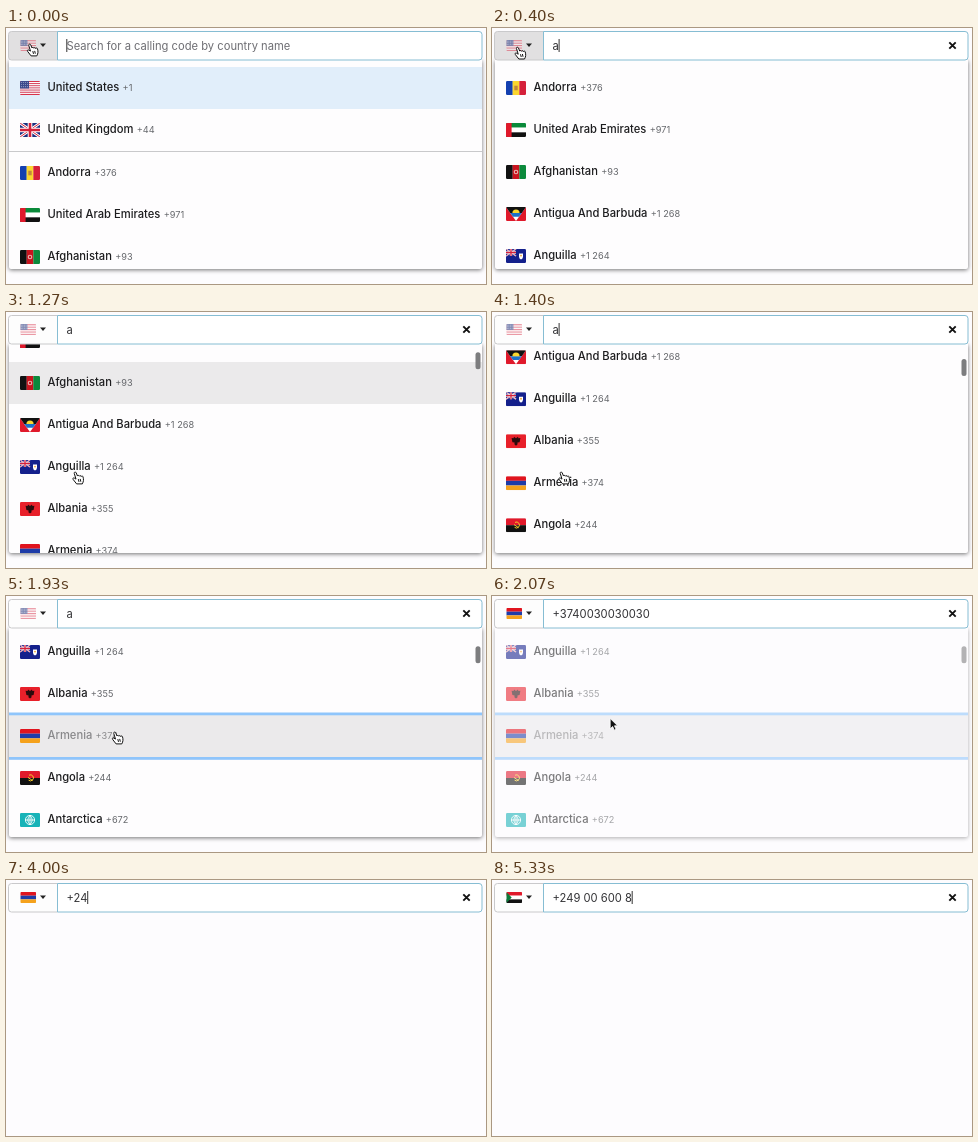
These frames come from a looping animation (480x256 px, 5390 ms). An HTML page:

```html
<!DOCTYPE html>
<html lang="en">
<head>
<meta charset="utf-8">
<title>Calling code picker</title>
<style>
  html, body { margin: 0; width: 100%; height: 100%; overflow: hidden; background: #fdfcfe; }
  svg { display: block; width: 100vw; height: 100vh; }
  text { font-family: Inter, Roboto, sans-serif; font-size: 11.2px; white-space: pre; }
  .name { font-weight: 500; fill: #1c1c1e; }
  .code { font-weight: 400; font-size: 9.2px; fill: #66686c; }
  .pressed .name, .pressed .code { fill: #88888a; }
  #sheet { filter: drop-shadow(0 1px 2px rgba(0, 0, 0, .55)); }
</style>
</head>
<body>
<svg viewBox="0 0 480 256" xmlns="http://www.w3.org/2000/svg">
  <defs>
    <clipPath id="listClip"><rect x="3" y="32" width="473" height="209"/></clipPath>
    <clipPath id="flagClip"><rect width="20" height="14" rx="1.2"/></clipPath>
  </defs>
  <g id="popup">
    <path id="sheet" d="M3 32H476V239a2 2 0 0 1-2 2H5a2 2 0 0 1-2-2Z" fill="#fefdfe"/>
    <g clip-path="url(#listClip)">
      <g id="start"></g>
      <g id="found">
        <rect id="hover" x="3" width="473" height="42" fill="#ebeaeb"/>
        <g id="ring" fill="#8fc5fb">
          <rect x="3" y="-2.5" width="473" height="2.8"/>
          <rect x="3" y="42" width="473" height="2.8"/>
        </g>
        <g id="rows"></g>
      </g>
      <rect id="thumb" x="469.5" width="5" height="17" rx="2.5" fill="#7d7d7f"/>
    </g>
  </g>
  <path id="button" d="M51.5 3.5H5.5a3 3 0 0 0-3 3V29a3 3 0 0 0 3 3H51.5Z" stroke="#c9c9cb"/>
  <g id="current"></g>
  <path d="M34 15.5h6l-3 3.6z" fill="#222"/>
  <path d="M51.5 3.5H473a3 3 0 0 1 3 3V29a3 3 0 0 1-3 3H51.5Z" fill="#fff" stroke="#86bdd3"/>
  <rect id="selection" x="60" y="10" height="15" fill="#b3d7fe"/>
  <text id="hint" x="60.5" y="21.7" fill="#6e6e73">Search for a calling code by country name</text>
  <text id="value" x="60.5" y="21.7" fill="#333336"></text>
  <rect id="caret" y="11" width="1" height="13" fill="#333"/>
  <path id="clear" d="M457.3 14.3l6.4 6.4m0-6.4l-6.4 6.4" stroke="#111" stroke-width="1.9"/>
  <path id="hand" fill="#fff" stroke="#111" stroke-width="1" stroke-linejoin="round"
    d="M-.9-.4C-1.8-.4-1.9.5-1.7 1.1L0 6.6-1.6 5.6C-2.8 5-3.6 6-2.9 6.9L.6 11.4H6.3C7.6 9 7.8 7 7 4.3 6.7 3.2 5.5 3.2 5.2 4 5 2.9 3.6 2.8 3.4 3.7 3 2.7 1.7 2.7 1.5 3.5L.2.3C0-.2-.4-.4-.9-.4ZM2.3 6.6l.7 2.8M4.2 6.4l.6 2.8"/>
  <path id="arrow" d="M0 0V10.4L2.5 8.1 4.1 11.7 5.9 10.9 4.3 7.4H7.5Z" fill="#111" stroke="#fff" stroke-width=".8"/>
</svg>
<script>
const $ = id => document.getElementById(id);
const rect = (x, y, w, h, c) => `<rect x="${x}" y="${y}" width="${w}" height="${h}" fill="${c}"/>`;
const path = (d, c) => `<path d="${d}" fill="${c}"/>`;
const line = (d, c, w) => `<path d="${d}" fill="none" stroke="${c}" stroke-width="${w}"/>`;
const dot = (x, y, r, c) => `<circle cx="${x}" cy="${y}" r="${r}" fill="${c}"/>`;
const bands = (...cs) => cs.map((c, i) => rect(0, i * 14 / cs.length, 20, 14 / cs.length, c)).join('');
const poles = (...cs) => cs.map((c, i) => rect(i * 20 / 3, 0, 20 / 3 + .1, 14, c)).join('');
const cross = line('M0 0L20 14M20 0L0 14', '#fff', 2.8) + line('M0 0L20 14M20 0L0 14', '#d3203a', 1) +
  line('M10 0V14M0 7H20', '#fff', 4.6) + line('M10 0V14M0 7H20', '#d3203a', 2.6);

const red = '#e0192b';
let stars = '';
for (let i = 0; i < 12; i++) stars += dot(1.3 + i % 4 * 2, 1.4 + Math.floor(i / 4) * 2.2, .45, '#fff');

const flags = {
  us: bands(...Array.from({length: 13}, (_, i) => i % 2 ? '#fff' : '#d8324a')) + rect(0, 0, 9, 7.5, '#3c4a8c') + stars,
  gb: rect(0, 0, 20, 14, '#1d3080') + cross,
  ad: poles('#1440b0', '#fbd62f', '#d5203a') + rect(8.3, 4.7, 3.4, 4.6, '#c2873c'),
  ae: bands('#0a8a3a', '#fff', '#111') + rect(0, 0, 5.6, 14, red),
  af: poles('#111', '#c8141e', '#0c8a3c') + dot(10, 7, 2.3, '#eab5b0') + dot(10, 7, 1.2, '#c8141e'),
  ag: rect(0, 0, 20, 14, red) + path('M0 0H20L10 14Z', '#fff') + path('M0 0H20L15.8 6H4.2Z', '#111') +
    path('M4.2 6H15.8L13 9.8H7Z', '#1d70c8') + path('M6.4 6a3.6 3.6 0 0 1 7.2 0Z', '#fbd62f'),
  ai: rect(0, 0, 20, 14, '#14208c') + `<g transform="scale(.5)">${rect(0, 0, 20, 14, '#14208c') + cross}</g>` +
    path('M13 4.5h4v3.2q0 2-2 2.8q-2-.8-2-2.8z', '#fff') + dot(15, 6.6, .9, '#f0a030'),
  al: rect(0, 0, 20, 14, '#e8202a') +
    path('M10 4L8 2.6 7.6 4 5.6 3.8 6.4 8 8.6 8.4 8.4 10.2 10 11.6 11.6 10.2 11.4 8.4 13.6 8 14.4 3.8 12.4 4 12 2.6Z', '#2a0a0c'),
  am: bands('#e0141e', '#1e3ca8', '#f5a21c'),
  ao: bands(red, '#111') + line('M9 4.2a3 3 0 1 1-.4 5M8 6.4l4.6 3.2', '#f5c828', 1),
  aq: rect(0, 0, 20, 14, '#17b3b8') + line('M14.6 7a4.6 4.6 0 1 1-9.2 0a4.6 4.6 0 1 1 9.2 0M5.4 7h9.2M10 2.4v9.2M10 2.4q-4.4 4.6 0 9.2q4.4-4.6 0-9.2', '#fff', .9),
  sd: bands(red, '#fff', '#111') + path('M0 0L6.8 7 0 14Z', '#0c7a3a')
};

const flag = (id, x, y, k = 1) =>
  `<g transform="translate(${x} ${y}) scale(${k})"><g clip-path="url(#flagClip)">${flags[id]}</g></g>`;
const row = ([id, name, code], y) => `<g>${flag(id, 14, y + 14)}<text x="41.5" y="${y + 24.2}" class="name">${name}` +
  `<tspan dx="3.3" class="code">${code}</tspan></text></g>`;

const H = 42, TOP = 39;
const matches = [
  ['ad', 'Andorra', '+376'], ['ae', 'United Arab Emirates', '+971'], ['af', 'Afghanistan', '+93'],
  ['ag', 'Antigua And Barbuda', '+1 268'], ['ai', 'Anguilla', '+1 264'], ['al', 'Albania', '+355'],
  ['am', 'Armenia', '+374'], ['ao', 'Angola', '+244'], ['aq', 'Antarctica', '+672']
];
$('rows').innerHTML = matches.map((m, i) => row(m, TOP + i * H)).join('');
$('start').innerHTML = rect(3, TOP, 473, H, '#e1eefa') + rect(3, 123, 473, 1, '#c9c9cb') +
  row(['us', 'United States', '+1'], TOP) + row(['gb', 'United Kingdom', '+44'], TOP + H) +
  matches.slice(0, 3).map((m, i) => row(m, TOP + 1 + (i + 2) * H)).join('');

const LOOP = 5390, STEP = 200 / 3;
const FILTER = 330, PICK = 1990, ERASE = 3330, SWITCH = 4130;

const typed = [
  [0, ''], [FILTER, 'a'], [PICK, '+3740030030030'], [ERASE, ''], [3800, '+'], [3930, '+2'], [4000, '+24'],
  [SWITCH, '+249'], [4270, '+249 0'], [4470, '+249 00'], [4670, '+249 00 6'], [4800, '+249 00 60'],
  [5000, '+249 00 600'], [5200, '+249 00 600 8']
];
// time, x, y of the pointer tip
const track = [
  [0, 24.5, 16.5], [70, 24.5, 16.5], [600, 27, 21], [1070, 70, 160.5], [1600, 70, 160.5],
  [1800, 109.5, 136.5], [1990, 109.5, 136.5], [2330, 170.5, 37.5]
];

const clamp = u => Math.max(0, Math.min(1, u));
const span = (t, a, b) => clamp((t - a) / (b - a));
const ease = u => u * u * (3 - 2 * u);
const show = (id, on) => $(id).style.display = on ? '' : 'none';
const move = (id, x, y) => $(id).setAttribute('transform', `translate(${x} ${y})`);

function pointer(t) {
  let i = track.length - 1;
  while (i && track[i][0] > t) i--;
  const a = track[i], b = track[i + 1] || a;
  const u = a === b ? 0 : ease(span(t, a[0], b[0]));
  return [a[1] + (b[1] - a[1]) * u, a[2] + (b[2] - a[2]) * u];
}

let shownFlag = '';
function draw(ms) {
  // the picture advances fifteen times a second
  const t = Math.floor((ms % LOOP + 4) / STEP) * STEP + 4;
  const [px, py] = pointer(t);
  const scroll = 172 * (1 - (1 - span(t, 1192, 1802)) ** 4);
  const open = t < PICK;

  const fade = 1 - span(t, PICK, 2180);
  show('popup', fade > 0);
  $('popup').style.opacity = fade;
  show('start', t < FILTER);
  show('found', t >= FILTER);
  move('found', 0, -scroll);

  const at = t > 1180 && t < 1600 ? 2 : Math.floor((py + scroll - TOP) / H);
  const pressed = t >= 1870;
  show('hover', py > TOP);
  const spot = pressed ? 6 : at;
  $('hover').setAttribute('y', TOP + spot * H);
  show('ring', pressed);
  move('ring', 0, TOP + 6 * H);
  $('rows').children[6].setAttribute('class', pressed ? 'pressed' : '');
  show('thumb', t > 1192);
  $('thumb').setAttribute('y', 33 + scroll * .1);

  $('button').setAttribute('fill', py < 32 && px < 51 ? '#e1e0e1' : '#fdfdfd');
  const id = open ? 'us' : t < SWITCH ? 'am' : 'sd';
  if (id !== shownFlag) {
    $('current').innerHTML = flag(id, 14.3, 12, .79);
    $('current').style.opacity = open ? .62 : 1;
    shownFlag = id;
  }

  const text = typed.filter(k => k[0] <= t).pop()[1];
  $('value').textContent = text;
  show('hint', t < FILTER);
  show('clear', text !== '');
  const width = text ? $('value').getComputedTextLength() : 0;
  const selected = t >= 3070 && t < ERASE;
  show('selection', selected);
  $('selection').setAttribute('width', width + 1);
  $('caret').setAttribute('x', 60.3 + width);
  show('caret', t < 870 || t > 1370 && t < 1870 || t > 2170 && t < 2665 || t > 3000 && !selected);

  show('hand', open);
  show('arrow', !open && t < ERASE);
  move('hand', px, py);
  move('arrow', px, py);
}

function loop() {
  draw(performance.now());
  requestAnimationFrame(loop);
}
loop();
</script>
</body>
</html>
```
